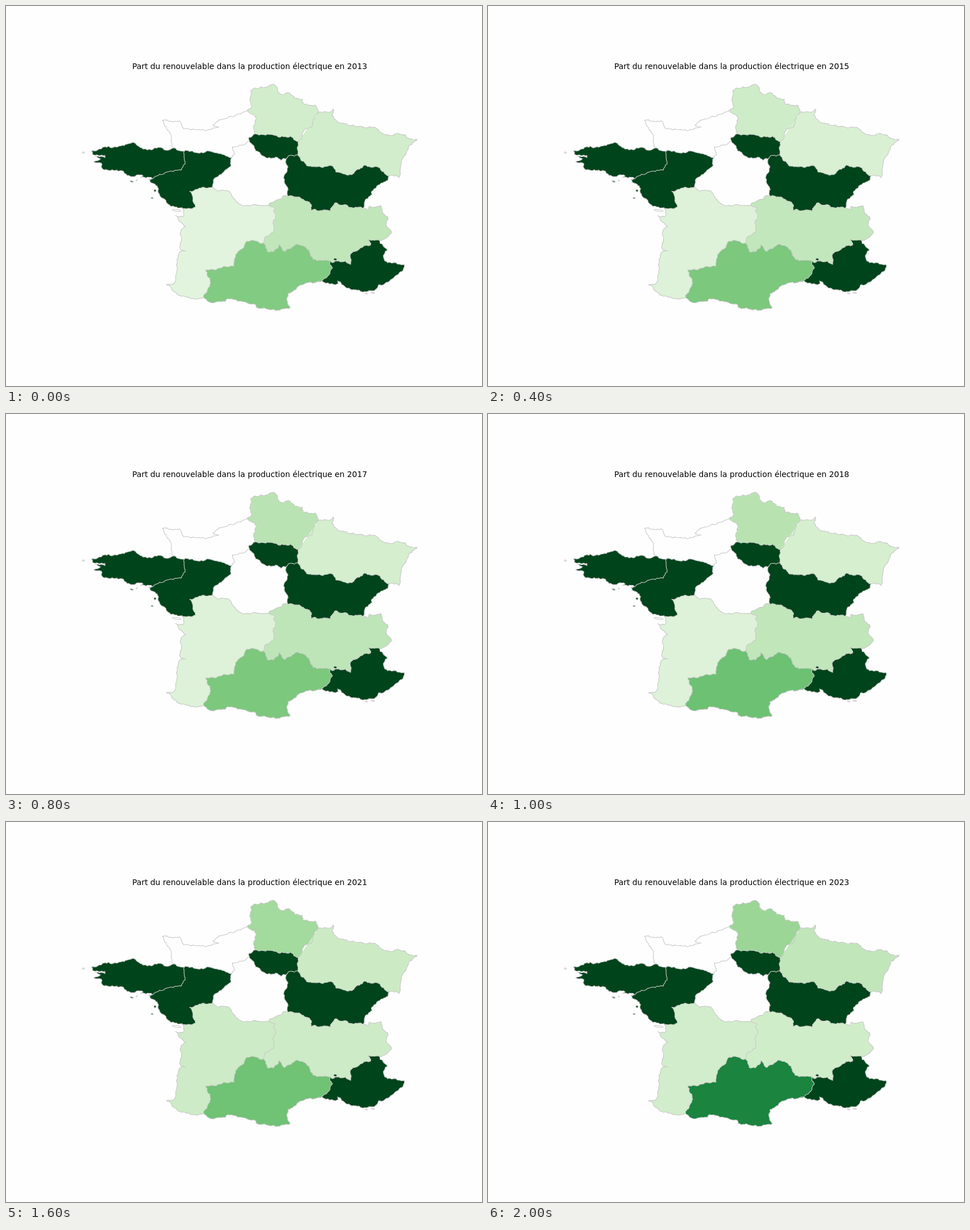
An HTML page with a canvas for the animation above (2200 ms loop, 837 by 669 pixels).

```html
<!DOCTYPE html>
<html lang="fr">
<head>
<meta charset="utf-8">
<style>
html, body { margin: 0; width: 100%; height: 100%; overflow: hidden; background: #fefefe; }
canvas { display: block; }
</style>
</head>
<body>
<canvas id="map" width="837" height="669"></canvas>
<script>
const ctx = document.getElementById('map').getContext('2d');
const STEP = 200, FIRST_YEAR = 2013, YEARS = 11;
const PAPER = '#fefefe', EDGE = '#c8c8c8', FULL = '#00441b';

// Points where borders meet
const nodes = {
  A: [424, 184], B: [438, 225], C: [514, 239], D: [548, 189], E: [513, 262], F: [494, 268],
  G: [428, 238], H: [397, 267], I: [313, 256], J: [299, 251], K: [251, 305], L: [363, 319],
  M: [309, 355], N: [462, 351], O: [496, 335], P: [453, 417], Q: [347, 513], R: [568, 448],
  S: [549, 485], T: [656, 412], U: [628, 356], V: [674, 299]
};

// Key points of the border between two nodes; the fine raggedness is generated
const borders = {
  JA: '292,246 291,231 275,201 305,202 312,216 350,220 375,213 364,210 376,200 412,190',
  AD: '432,176 430,149 448,142 473,139 477,149 485,156 499,153 508,163 521,164 522,172 545,175',
  AB: '437,192',
  BC: '467,226 482,231 500,229',
  DC: '540,201 538,213 525,217 521,228',
  CE: '512,249',
  EF: '500,263',
  FG: '484,272 474,266 452,264 439,255',
  GB: '427,231',
  GH: '422,242 398,248 402,261',
  IH: '333,258 353,255 378,260 384,262',
  JI: '306,255',
  JK: '285,254 272,249 257,253 241,252 222,240 203,246 188,249 173,248 150,255 152,261 174,263 174,267 157,264 166,269 154,274 168,277 170,287 203,290 217,299 241,299 236,302 257,303',
  IK: '315,278 308,289 270,296',
  KM: '266,317 270,333 290,353',
  ML: '333,354 323,326 350,320',
  HL: '396,281 367,303',
  LN: '372,326 389,325 404,344 417,352',
  NO: '465,346 486,336',
  FO: '492,272 496,283 488,303 495,319',
  EV: '519,272 533,282 573,281 580,292 596,296 612,294 630,280 642,284 655,284',
  DV: '569,187 575,181 573,192 582,203 603,210 650,214 657,222 679,228 684,225 723,235 708,246 698,267 692,302',
  VU: '671,307 655,315 643,326 644,332 631,344',
  OU: '518,338 537,350 536,360 571,361 578,347 611,356',
  UT: '637,359 638,353 660,352 662,363 671,371 669,387 678,398 672,406',
  RT: '574,452 597,449 606,455 605,440 614,432 641,421 637,412',
  NP: '473,355 471,363 474,374 469,383 471,398 458,405',
  PR: '459,432 470,433 480,420 491,432 510,419 528,426 540,446',
  PQ: '424,414 403,443 401,458 351,465 359,485',
  MQ: '313,360 311,371 298,369 316,388 308,394 307,429 316,431 306,433 300,468 293,490 282,491 298,504 334,516',
  QS: '357,521 386,520 390,515 438,525 440,531 475,536 500,531 495,523 496,506 513,494 530,487',
  SR: '566,475 574,461',
  ST: '576,490 584,489 583,484 598,496 632,503 650,499 655,491 665,490 699,462 700,455 671,452 664,443 671,430'
};

const regions = {
  north: 'AD DC CB BA', east: 'DV VE EC', southwest: 'ML LN NP PQ QM',
  alps: 'NO OU UT TR RP PN', south: 'PR RS SQ QP',
  capital: 'BC CE EF FG GB', brittany: 'JI IK KJ', loire: 'IH HL LM MK KI',
  burgundy: 'EV VU UO OF FE', riviera: 'RT TS SR'
};

// Renewable share on the colour scale at key years, linear in between
const keyYears = [2013, 2014, 2016, 2018, 2021, 2022, 2023];
const shares = {
  north: [0.208, 0.158, 0.289, 0.299, 0.368, 0.408, 0.392],
  east: [0.208, 0.158, 0.196, 0.192, 0.229, 0.408, 0.27],
  southwest: [0.137, null, 0.158, 0.158, 0.225, 0.322, 0.208],
  alps: [0.27, 0.242, 0.286, 0.27, 0.225, 0.229, 0.212],
  south: [0.461, 0.517, 0.436, 0.517, 0.51, 0.542, 0.779]
};
const greens = ['f7fcf5', 'e5f5e0', 'c7e9c0', 'a1d99b', '74c476', '41ab5d', '238b45', '006d2c', '00441b']
  .map(hex => [0, 2, 4].map(i => parseInt(hex.slice(i, i + 2), 16)));

// Centre and radii
const islands = [
  [136, 258, 2, 1], [221, 309, 3, 1], [230, 307, 1, 1], [262, 325, 2, 2],
  [257, 338, 2, 1], [300, 360, 8, 1.5], [579, 446, 3, 2], [634, 506, 2, 1], [645, 505, 3, 1]
];

const lerp = (a, b, t) => a + (b - a) * t;

function shade(value) {
  const i = Math.min(Math.floor(value * 8), 7);
  return `rgb(${greens[i].map((c, k) => Math.round(lerp(c, greens[i + 1][k], value * 8 - i)))})`;
}

function fillFor(name, year) {
  const row = shares[name];
  if (!row) return FULL;
  const next = keyYears.findIndex(y => y >= year);
  if (keyYears[next] === year) return row[next] === null ? PAPER : shade(row[next]);
  const prev = next - 1;
  const t = (year - keyYears[prev]) / (keyYears[next] - keyYears[prev]);
  return shade(lerp(row[prev] ?? row[next], row[next], t));
}

let seed = 7;
const random = () => (seed = seed * 16807 % 2147483647) / 2147483647;

// Midpoint displacement until the pieces are short
function ragged(a, b) {
  const dx = b[0] - a[0], dy = b[1] - a[1];
  if (Math.hypot(dx, dy) < 4) return [b];
  const k = (random() - 0.5) * Math.min(0.4, 4 / Math.hypot(dx, dy));
  const mid = [a[0] + dx / 2 - dy * k, a[1] + dy / 2 + dx * k];
  return [...ragged(a, mid), ...ragged(mid, b)];
}

function toPath(points) {
  const path = new Path2D();
  points.forEach(([x, y]) => path.lineTo(x, y));
  return path;
}

const lines = {};
for (const key in borders) {
  const inner = borders[key].split(' ').map(pair => pair.split(',').map(Number));
  const points = [nodes[key[0]], ...inner, nodes[key[1]]];
  lines[key] = points.flatMap((p, i) => i ? ragged(points[i - 1], p) : [p]);
}
const line = key => lines[key] || [...lines[key[1] + key[0]]].reverse();

const areas = Object.entries(regions).map(([name, keys]) => ({
  name, path: toPath(keys.split(' ').flatMap(line))
}));
const edges = Object.values(lines).map(toPath);

function draw(year) {
  ctx.fillStyle = PAPER;
  ctx.fillRect(0, 0, 837, 669);

  for (const { name, path } of areas) {
    ctx.fillStyle = fillFor(name, year);
    ctx.fill(path);
  }

  ctx.strokeStyle = EDGE;
  ctx.lineWidth = 1.1;
  ctx.lineJoin = 'round';
  edges.forEach(path => ctx.stroke(path));

  ctx.fillStyle = FULL;
  for (const [x, y, rx, ry] of islands) {
    ctx.beginPath();
    ctx.ellipse(x, y, rx, ry, 0.15, 0, Math.PI * 2);
    if (rx > 1 && rx < 4 && x > 200 && x < 600) ctx.fill();
    ctx.stroke();
  }

  ctx.fillStyle = '#000';
  ctx.font = '13.89px "DejaVu Sans", sans-serif';
  ctx.textAlign = 'center';
  ctx.fillText('Part du renouvelable dans la production électrique en ' + year, 428.5, 111);
}

const start = performance.now();
function tick() {
  draw(FIRST_YEAR + Math.floor((performance.now() - start) / STEP) % YEARS);
  requestAnimationFrame(tick);
}
tick();
</script>
</body>
</html>
```
